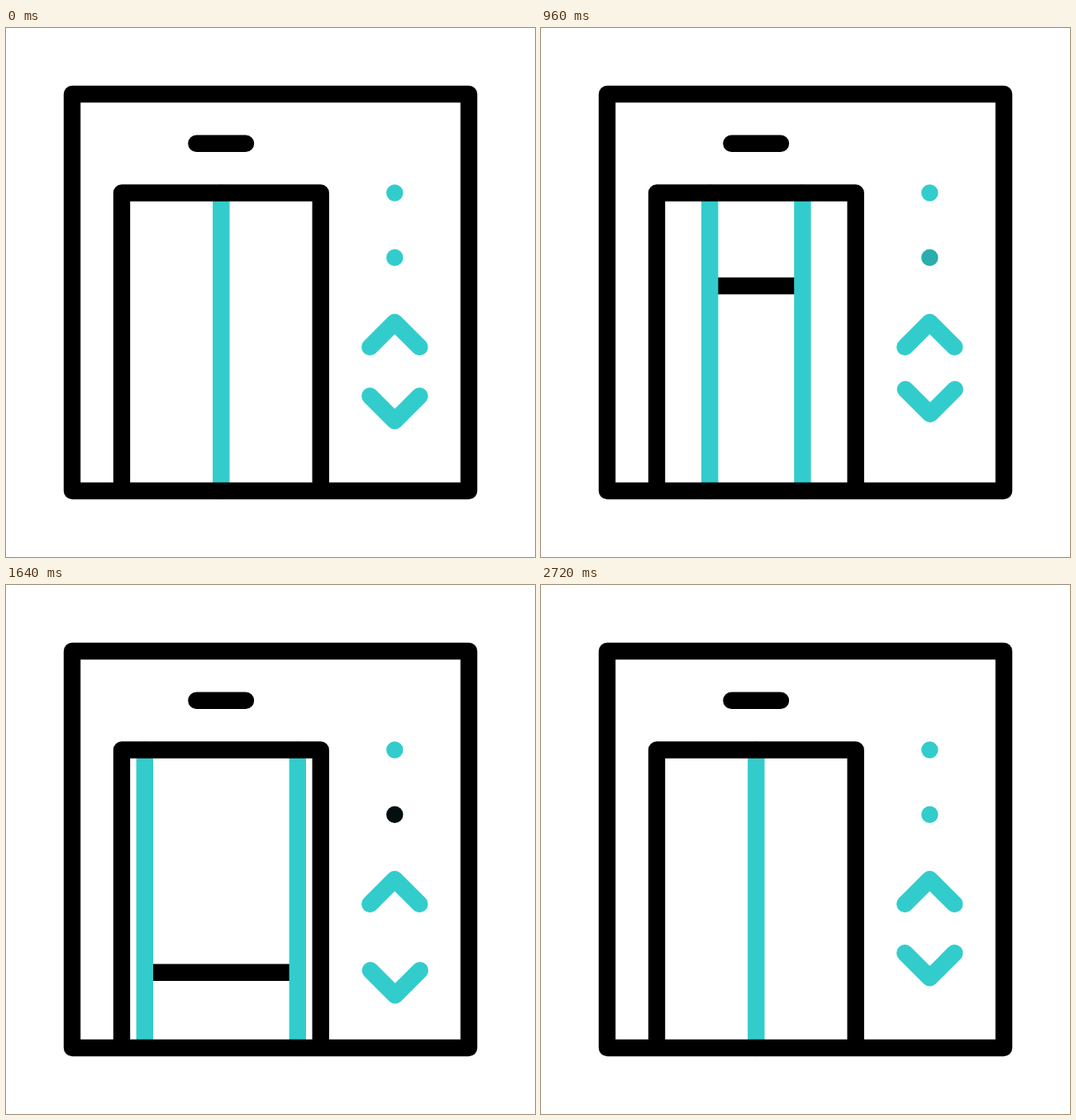
An HTML page for the animation above (3 s loop, 640x640 px).

```html
<!DOCTYPE html>
<html lang="en">
<head>
<meta charset="utf-8">
<title>Elevator</title>
<style>
  html, body { margin: 0; width: 100%; height: 100%; overflow: hidden; background: #fff; }
  svg { display: block; width: 100%; height: 100%; }
  path { fill: none; stroke: #000; stroke-width: 20.4; stroke-linecap: round; stroke-linejoin: round; }
  .teal { stroke: #3cc; }
</style>
</head>
<body>
<svg viewBox="0 0 640 640">
  <path id="floor" style="stroke-linecap: butt"/>
  <path id="doors" class="teal"/>
  <path d="M80 80H560V560H80Z M140 560V199.5H380.7V560 M230.4 139.7H290"/>
  <path class="teal" d="M470.3 199.5h0 M440.3 386l30-30 30 30"/>
  <path id="lamp" d="M470.3 277.7h0"/>
  <path id="down" class="teal" d="M440.3 445.3l30 30 30-30"/>
</svg>
<script>
const LOOP = 3000, STEP = 40;
const [floor, doors, lamp, down] =
  ['floor', 'doors', 'lamp', 'down'].map(id => document.getElementById(id));

// Eased interpolation through [time, value] keys.
function track(keys, t) {
  if (t <= keys[0][0]) return keys[0][1];
  for (let i = 1; i < keys.length; i++) {
    const [t0, a] = keys[i - 1], [t1, b] = keys[i];
    if (t < t1) {
      const u = (t - t0) / (t1 - t0);
      return a + (b - a) * u * u * (3 - 2 * u);
    }
  }
  return keys[keys.length - 1][1];
}

const GAP = [[480, 0], [1320, 92.5], [2160, 92.5], [2720, 0]];
const DIP = [[480, 0], [960, -8.2], [1520, 23], [2160, 0]];
const DARK = [[120, 0], [445, 0.97], [760, 0], [1560, 0.97], [2240, 0]];

// Height of the cabin floor, slowing down until it rests.
function floorY(t) {
  const w = Math.max(0, 2160 - t) / 1000;
  return 532 - w * (17 + w * (249 - 92 * w));
}

function draw(t) {
  const gap = track(GAP, t), left = 260.3 - gap, right = 260.3 + gap;
  doors.setAttribute('d', `M${left} 199.5V560M${right} 199.5V560`);
  floor.setAttribute('d', `M${left} ${floorY(t)}H${right}`);

  const light = 1 - track(DARK, t);
  lamp.style.stroke = `rgb(${51 * light}, ${204 * light}, ${204 * light})`;

  const nudge = t > 480 && t < 2160 ? 0.5 : 0;
  down.setAttribute('transform', `translate(${nudge} ${track(DIP, t)})`);
}

function tick() {
  draw(Math.floor(performance.now() % LOOP / STEP) * STEP);
  requestAnimationFrame(tick);
}
tick();
</script>
</body>
</html>
```
